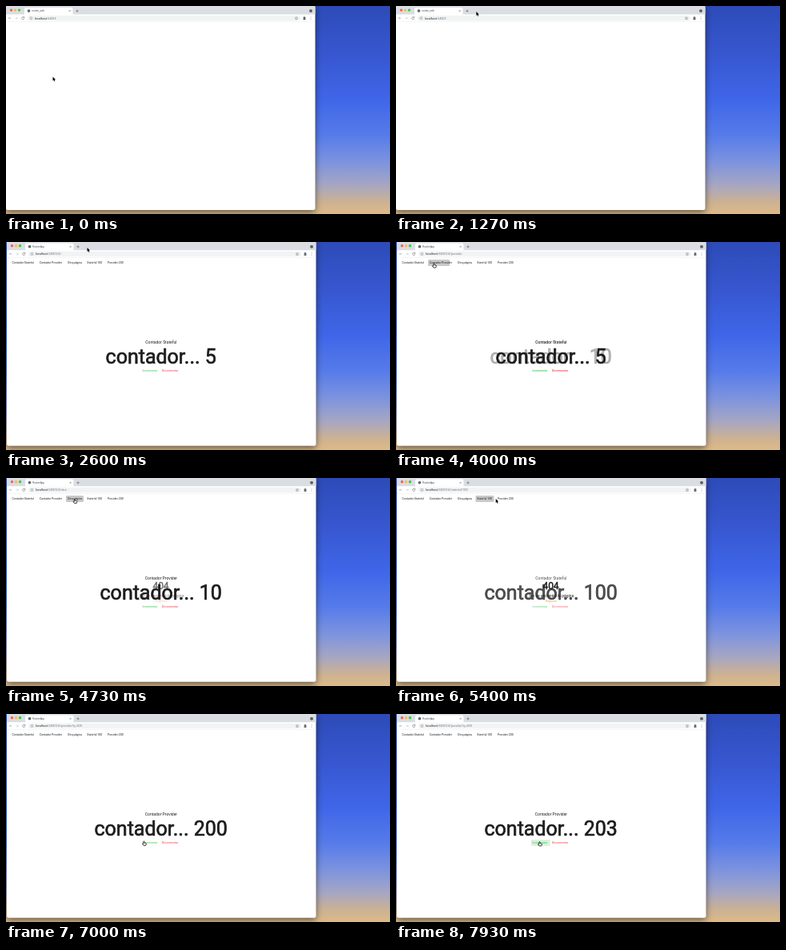
Write an HTML page with a canvas that moves like this. It is 480 px wide and 260 px high and loops after 8000 ms.

```html
<!DOCTYPE html>
<html lang="es">
<head>
<meta charset="utf-8">
<title>Contador</title>
<style>
  html, body { margin: 0; width: 100%; height: 100%; overflow: hidden; }
  canvas { display: block; width: 480px; height: 260px; }
</style>
</head>
<body>
<canvas></canvas>
<script>
const LOOP = 8000, W = 480, H = 260, FADE = 200;
const canvas = document.querySelector('canvas');
const ctx = canvas.getContext('2d');
const dpr = window.devicePixelRatio || 1;
canvas.width = W * dpr;
canvas.height = H * dpr;

const INK = '#1d1d1f', GREEN = '#39c04c', RED = '#f0394a', ORANGE = '#f0a04b';
const SHIFT_AT = 1700, APP_AT = 1800;

// time, x, y of the pointer tip
const pointerPath = [
  [0, 58.5, 88.5], [180, 58.5, 88.5], [820, 100, 7], [2000, 101, 7],
  [2700, 101.5, 7], [3480, 47.5, 27], [4100, 47.5, 27], [4420, 86, 26.5],
  [4750, 86, 26.5], [5080, 111, 26], [5270, 112, 26], [5400, 124.7, 26],
  [5560, 136, 26], [6000, 137, 26], [6400, 150, 76], [6850, 172.5, 159.3],
  [7050, 172.5, 159.3], [7260, 179.5, 159.8], [8000, 179.5, 159.8],
];

const buttons = {
  stateful: { label: 'Contador Stateful', x: 7.5, y: 27.2, box: [5.5, 22, 31.5, 8] },
  provider: { label: 'Contador Provider', x: 41.8, y: 27.2, box: [40, 22, 32, 8] },
  other:    { label: 'Otra página', x: 77, y: 27.2, box: [75, 22, 22, 8] },
  base100:  { label: 'Stateful 100', x: 101.3, y: 27.2, box: [99.5, 22, 23, 8] },
  query200: { label: 'Provider 200', x: 127, y: 27.2, box: [125.3, 22, 23.5, 8] },
  plus:     { label: 'Incrementar', x: 170.5, y: 162.4, box: [169, 157, 23.5, 8], color: GREEN },
  minus:    { label: 'Decrementar', x: 195, y: 162.4, box: [193, 157, 24, 8], color: RED },
};
const menu = ['stateful', 'provider', 'other', 'base100', 'query200'];

const presses = [
  [3860, 'provider'], [4540, 'other'], [5170, 'base100'], [5700, 'query200'],
  [7280, 'plus'], [7520, 'plus'], [7770, 'plus'],
];

const pages = [
  { at: APP_AT, path: '/#/', title: 'Contador Stateful', count: 5 },
  { at: 3940, path: '/#/provider', title: 'Contador Provider', count: 10 },
  { at: 4620, path: '/#/otra', missing: true },
  { at: 5250, path: '/#/stateful/100', title: 'Contador Stateful', count: 100 },
  { at: 5780, path: '/#/provider?q=200', title: 'Contador Provider', count: 200 },
];

const clamp = v => Math.max(0, Math.min(1, v));
const ease = v => v * v * (3 - 2 * v);

// Sizes are in quarter pixels, so small labels keep true proportions.
function text(str, x, y, size, { color = INK, align = 'left', bold = 0 } = {}) {
  ctx.save();
  ctx.translate(x, y);
  ctx.scale(.25, .25);
  ctx.font = `${size}px Roboto, sans-serif`;
  ctx.textAlign = align;
  ctx.fillStyle = ctx.strokeStyle = color;
  ctx.fillText(str, 0, 0);
  if (bold) {
    ctx.lineWidth = bold;
    ctx.lineJoin = 'round';
    ctx.strokeText(str, 0, 0);
  }
  const width = ctx.measureText(str).width / 4;
  ctx.restore();
  return width;
}

function box(x, y, w, h, r, color) {
  ctx.fillStyle = color;
  ctx.beginPath();
  ctx.roundRect(x, y, w, h, r);
  ctx.fill();
}

function dot(x, y, r, color) {
  ctx.fillStyle = color;
  ctx.beginPath();
  ctx.arc(x, y, r, 0, 7);
  ctx.fill();
}

function stroke(d, color = '#5f6368', width = .5) {
  ctx.strokeStyle = color;
  ctx.lineWidth = width;
  ctx.stroke(new Path2D(d));
}

function desktop() {
  const sky = ctx.createLinearGradient(0, 0, 0, H);
  [[0, '#2d4bb8'], [.25, '#3858d2'], [.45, '#3f66e8'], [.62, '#567be9'],
   [.75, '#7d93de'], [.86, '#a6a6c2'], [.94, '#cbb193'], [1, '#deba86']]
    .forEach(([at, color]) => sky.addColorStop(at, color));
  ctx.fillStyle = sky;
  ctx.fillRect(0, 0, W, H);
}

function browser(t) {
  const loaded = t >= APP_AT;
  const page = pages.filter(p => t >= p.at).pop();
  ctx.save();
  ctx.translate(t < SHIFT_AT ? 0 : 1, t < SHIFT_AT ? .3 : 0);

  ctx.save();
  ctx.shadowColor = 'rgba(0,0,0,.5)';
  ctx.shadowBlur = 9 * dpr;
  ctx.shadowOffsetY = 3 * dpr;
  box(0, -1, 386.5, 255.7, 2.5, '#fff');
  ctx.restore();

  box(0, -1, 386.5, 11.2, [2.5, 2.5, 0, 0], '#dadde2');
  ['#fc5b57', '#f5bd3f', '#36c84b'].forEach((c, i) => dot(6.5 + i * 5, 4.8, 1.7, c));
  box(23, 1.6, 60.5, 9, [2, 2, 0, 0], '#fff');
  dot(28.5, 5.8, 1.8, '#4b4f54');
  stroke('M27.2 5.2h1.4l.6 1M28.2 7.2l.8-.6', '#d5d7da', .4);
  text(loaded ? 'RoutesApp' : 'routes_web', 32.3, 6.9, 12, { color: '#45494d' });
  stroke('M78.8 5l1.6 1.6m0-1.6l-1.6 1.6', '#3c4043');
  stroke('M89 4.3v3.2m-1.6-1.6h3.2', '#3c4043');
  dot(381, 5.8, 1.9, '#45484d');
  stroke('M380.2 5.5l.8.8.8-.8', '#fff', .4);

  stroke('M0 19.4H386.5', '#e4e6e8', .4);
  stroke('M6.4 14.9h-3m1.3-1.3l-1.3 1.3 1.3 1.3', '#8b8f94');
  stroke('M11.4 14.9h3m-1.3-1.3l1.3 1.3-1.3 1.3', '#b4b7ba');
  stroke('M22.6 14A1.6 1.6 0 1 0 22.8 15.4M22.9 13v1.3h-1.3', '#4b4f54');
  box(27, 11.7, 341, 6.4, 3.2, '#f1f3f4');
  stroke('M33 14.9a1.6 1.6 0 1 0-3.2 0a1.6 1.6 0 1 0 3.2 0M31.4 14.7v1.1M31.4 13.9v.3', '#6f7378', .4);
  const host = text('localhost', 35.8, 16.2, 15, { color: '#26282b' });
  text(':54505' + (page ? page.path : ''), 35.8 + host, 16.2, 15, { color: '#777b80' });
  stroke('M363 13.2l.5 1.2 1.3.1-1 .9.3 1.3-1.1-.7-1.1.7.3-1.3-1-.9 1.3-.1z', '#5f6368', .4);
  dot(373, 14.9, 2.2, '#c9ced4');
  dot(373, 14.2, .9, '#3f454c');
  box(371.6, 15.3, 2.8, 1.4, [1.2, 1.2, .3, .3], '#3f454c');
  [13.4, 14.9, 16.4].forEach(y => dot(381, y, .4, '#5f6368'));
  ctx.restore();
}

function ripple(t) {
  for (const [at, name] of presses) {
    const age = t - at;
    if (age < 0 || age > 480) continue;
    const b = buttons[name];
    const [px, py] = pointer(at);
    ctx.save();
    ctx.beginPath();
    ctx.roundRect(...b.box, 1);
    ctx.clip();
    ctx.globalAlpha = clamp(age / 60) * clamp((480 - age) / 180);
    dot(px, py, 2 + age * .125, b.color ? '#d9f3dd' : '#c9c9c9');
    ctx.restore();
  }
}

function button(name) {
  const { label, x, y, color } = buttons[name];
  text(label, x, y, 14, { color });
}

function content(page, t) {
  const center = { align: 'center' };
  if (page.missing) {
    text('404', 193.5, 139.3, 48, { ...center, bold: 1.8 });
    text('No se encontró la página', 194.5, 148.7, 20, center);
    text('Regresar', 194, 155.4, 14, { ...center, color: ORANGE });
    return;
  }
  const added = page === pages.at(-1)
    ? presses.filter(([at, name]) => name === 'plus' && t >= at + 50).length : 0;
  text(page.title, 193.9, 126.8, 20, center);
  text(`contador... ${page.count + added}`, 193.7, 151.8, 100, { ...center, bold: 2.8 });
  button('plus');
  button('minus');
}

function app(t) {
  const index = pages.findLastIndex(p => t >= p.at);
  if (index < 0) return;
  ripple(t);
  menu.forEach(button);
  const page = pages[index];
  const shown = index ? clamp((t - page.at) / FADE) : 1;
  // The previous page stays until the new one is opaque.
  if (shown < 1) content(pages[index - 1], t);
  ctx.save();
  ctx.globalAlpha = shown;
  content(page, t);
  ctx.restore();
}

function pointer(t) {
  const i = Math.max(1, pointerPath.findIndex(p => t < p[0]));
  const [t0, x0, y0] = pointerPath[i - 1];
  const [t1, x1, y1] = pointerPath[i];
  const k = ease(clamp((t - t0) / (t1 - t0)));
  return [x0 + (x1 - x0) * k, y0 + (y1 - y0) * k];
}

const ARROW = new Path2D('M0 0V4.9L1.15 3.9 2 5.8 2.9 5.4 2.1 3.6H3.5Z');
const HAND = new Path2D('M-.5 .2Q0-.4 .5 .2V1.8L2.4 2.2Q2.9 2.5 2.7 3.3L2.2 5H-.6L-2 3.1Q-1.9 2.4-.5 3Z');

function drawPointer(t) {
  const [x, y] = pointer(t);
  const over = t >= APP_AT && Object.values(buttons).some(({ box: [bx, by, w, h] }) =>
    x > bx && x < bx + w && y > by && y < by + h);
  ctx.save();
  ctx.translate(x, y);
  ctx.lineJoin = 'round';
  ctx.lineWidth = over ? .6 : .9;
  ctx.strokeStyle = over ? '#111' : '#fff';
  ctx.fillStyle = over ? '#fff' : '#000';
  const shape = over ? HAND : ARROW;
  ctx.stroke(shape);
  ctx.fill(shape);
  if (over) ctx.stroke(shape);
  ctx.restore();
}

function frame(now) {
  const t = now % LOOP;
  ctx.setTransform(dpr, 0, 0, dpr, 0, 0);
  desktop();
  browser(t);
  app(t);
  drawPointer(t);
}

const start = performance.now();
function tick() {
  frame(performance.now() - start);
  requestAnimationFrame(tick);
}
tick();
</script>
</body>
</html>
```
